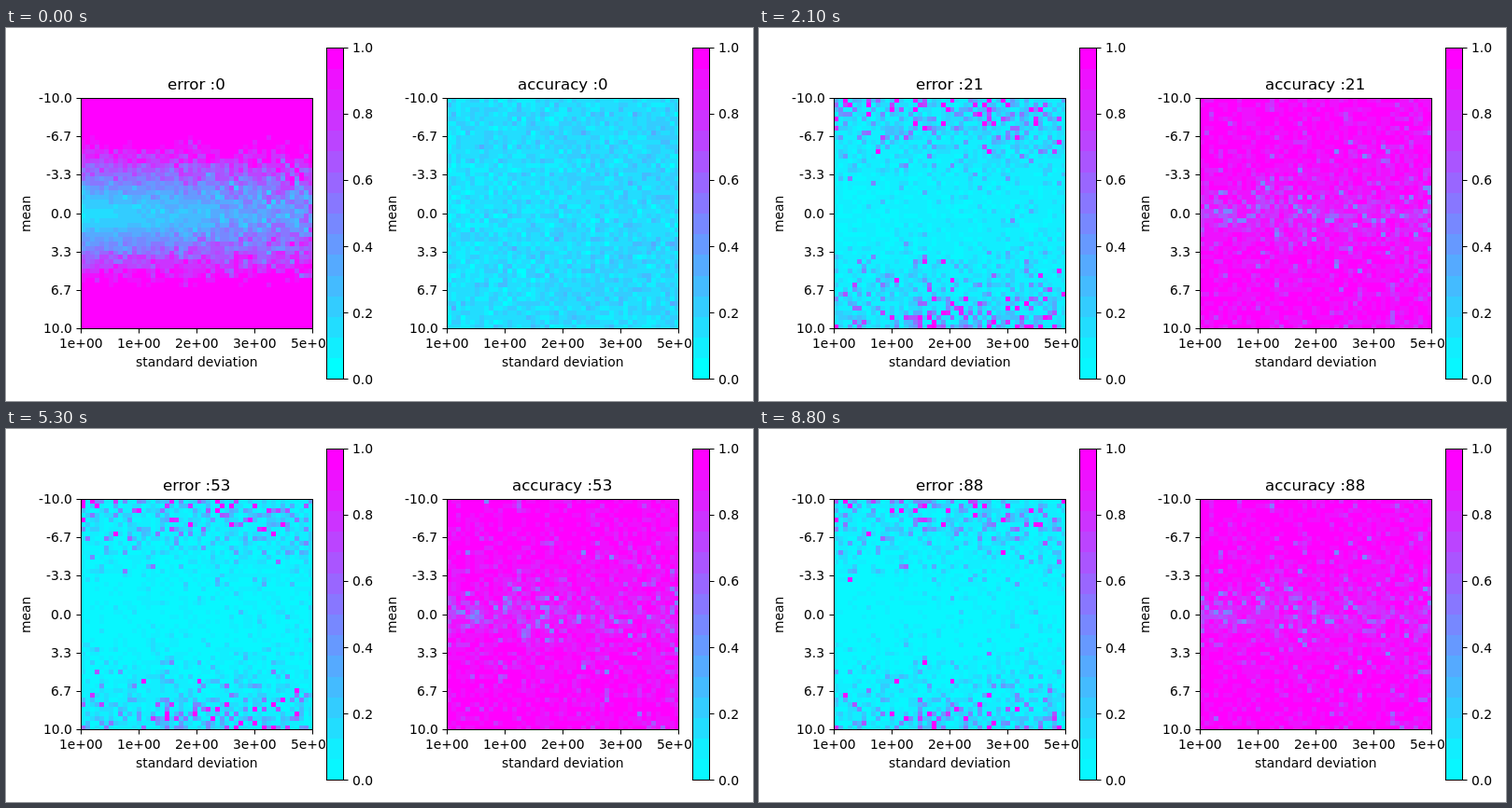
An HTML page with a canvas that plays this animation: 800x400 px, repeating every 8.9 s.

```html
<!DOCTYPE html>
<html>
<head>
<meta charset="utf-8">
<style>
html, body { margin: 0; width: 100%; height: 100%; overflow: hidden; background: #fff; }
canvas { display: block; }
</style>
</head>
<body>
<canvas width="800" height="400"></canvas>
<script>
const ctx = document.querySelector('canvas').getContext('2d');
const CELLS = 50, LEFT = 80.5, TOP = 75.5, WIDTH = 248, HEIGHT = 247;
const BAR = { x: 343.5, y: 21.5, w: 18, h: 355 };
const STEP_MS = 100, EPOCHS = 89, LEVELS = 16;

function random(a, b, seed) {
  let h = Math.imul(a + 1, 374761393) ^ Math.imul(b + 7, 668265263) ^ Math.imul(seed + 3, 1274126177);
  h = Math.imul(h ^ (h >>> 15), 2246822519);
  h = Math.imul(h ^ (h >>> 13), 3266489917);
  return ((h ^ (h >>> 16)) >>> 0) / 4294967296;
}

function gauss(col, row, seed) {
  const u = 1 - random(col, row, seed), v = random(col, row, seed + 5000);
  return Math.sqrt(-2 * Math.log(u)) * Math.cos(2 * Math.PI * v);
}

// Mostly fixed per cell, with some change from epoch to epoch
function cellNoise(col, row, epoch, seed) {
  return 0.88 * gauss(col, row, seed) + 0.47 * gauss(col, row, seed + 10 + epoch);
}

function errorAt(col, row, epoch) {
  const mean = -10 + 20 * row / (CELLS - 1), dev = col / (CELLS - 1), edge = Math.abs(mean) / 10;
  const spread = (0.11 + 0.13 * dev) * Math.exp(-((mean / 7) ** 4));
  const start = Math.hypot(0.13 + 0.34 * dev, 0.155 * mean) * (1 + spread * gauss(col, row, 1));
  const early = Math.exp(-epoch / 22);
  const scale = (0.015 + 0.015 * dev + 0.1 * edge * edge) * (1 + 0.8 * early);
  const tail = 0.75 + 0.5 * edge;
  const end = 0.02 + 0.06 * early + scale * Math.exp(tail * cellNoise(col, row, epoch, 100));
  return end + (start - end) * Math.exp(-epoch / 2.5);
}

function accuracyAt(col, row, epoch) {
  const mean = -10 + 20 * row / (CELLS - 1), dev = col / (CELLS - 1);
  const start = 0.15 + 0.03 * dev + 0.055 * gauss(col, row, 2);
  const loss = 0.042 + 0.022 * dev + 0.035 * Math.exp(-((mean / 4) ** 2))
    + 0.11 * (1 - 0.7 * dev) * Math.exp(-((mean / 1.5) ** 2));
  const early = 1 + 0.4 * Math.exp(-epoch / 25);
  const end = 1 - Math.min(0.55, loss * early * Math.exp(0.72 * cellNoise(col, row, epoch, 300)));
  return end + (start - end) * Math.exp(-epoch / 3);
}

function color(value, epoch) {
  const level = Math.max(0, Math.min(LEVELS - 1, Math.floor(value * LEVELS)));
  const c = Math.max(epoch ? 0.03 : 0, level / (LEVELS - 1));
  return `rgb(${Math.round(255 * c)},${Math.round(255 * (1 - c))},255)`;
}

// Anchor is the share of the text's width left of x; the start snaps to whole pixels
function text(str, x, y, anchor = 0.5, size = 13.89) {
  ctx.font = `${size}px "DejaVu Sans", sans-serif`;
  ctx.fillStyle = '#000';
  ctx.fillText(str, Math.round(x - anchor * ctx.measureText(str).width), Math.round(y));
}

function line(x1, y1, x2, y2) {
  ctx.beginPath();
  ctx.moveTo(x1, y1);
  ctx.lineTo(x2, y2);
  ctx.stroke();
}

function drawCells(valueAt, epoch) {
  const colEdge = i => Math.round(LEFT + i * WIDTH / CELLS);
  const rowEdge = i => Math.round(TOP + i * HEIGHT / CELLS);
  for (let row = 0; row < CELLS; row++) {
    for (let col = 0; col < CELLS; col++) {
      const x = colEdge(col), y = rowEdge(row);
      ctx.fillStyle = color(valueAt(col, row, epoch), epoch);
      ctx.fillRect(x, y, colEdge(col + 1) - x, rowEdge(row + 1) - y);
    }
  }
}

function drawAxes() {
  const bottom = TOP + HEIGHT;
  ctx.strokeRect(LEFT, TOP, WIDTH, HEIGHT);
  ['1e+00', '1e+00', '2e+00', '3e+00', '5e+00'].forEach((label, i) => {
    const x = LEFT + i * WIDTH / 4;
    line(x, bottom, x, bottom + 5);
    text(label, x - 0.5, 343);
  });
  ['-10.0', '-6.7', '-3.3', '0.0', '3.3', '6.7', '10.0'].forEach((label, i) => {
    const y = Math.floor(TOP + i * HEIGHT / 6) + 0.5;
    line(LEFT - 5, y, LEFT, y);
    text(label, 70.5, y + 4.7, 1);
  });
  text('standard deviation', 204, 363);
  ctx.save();
  ctx.translate(26, 199);
  ctx.rotate(-Math.PI / 2);
  text('mean', 0, 0);
  ctx.restore();
}

function drawColorbar(epoch) {
  const { x, y, w, h } = BAR;
  // Covers the end of the last axis label
  for (let i = 0; i < LEVELS; i++) {
    const top = Math.round(y + h * (1 - (i + 1) / LEVELS));
    const bottom = Math.round(y + h * (1 - i / LEVELS));
    ctx.fillStyle = color((i + 0.5) / LEVELS, epoch);
    ctx.fillRect(x, top, w, bottom - top);
  }
  ctx.strokeRect(x, y, w, h);
  for (let i = 0; i <= 5; i++) {
    const tick = y + h * (1 - i / 5);
    line(x + w, tick, x + w + 5, tick);
    text((i / 5).toFixed(1), 371, 381.7 - 71.1 * i, 0);
  }
}

function drawPanel(offset, title, valueAt, epoch) {
  ctx.save();
  ctx.translate(offset, 0);
  drawCells(valueAt, epoch);
  drawAxes();
  drawColorbar(epoch);
  text(`${title} :${epoch}`, 204, 66, 0.5, 16.67);
  ctx.restore();
}

let shown = -1;
function render() {
  const epoch = Math.floor(performance.now() / STEP_MS) % EPOCHS;
  if (epoch !== shown) {
    shown = epoch;
    ctx.fillStyle = '#fff';
    ctx.fillRect(0, 0, 800, 400);
    ctx.strokeStyle = '#000';
    ctx.lineWidth = 1;
    drawPanel(0, 'error', errorAt, epoch);
    drawPanel(392, 'accuracy', accuracyAt, epoch);
  }
  requestAnimationFrame(render);
}
render();
</script>
</body>
</html>
```
